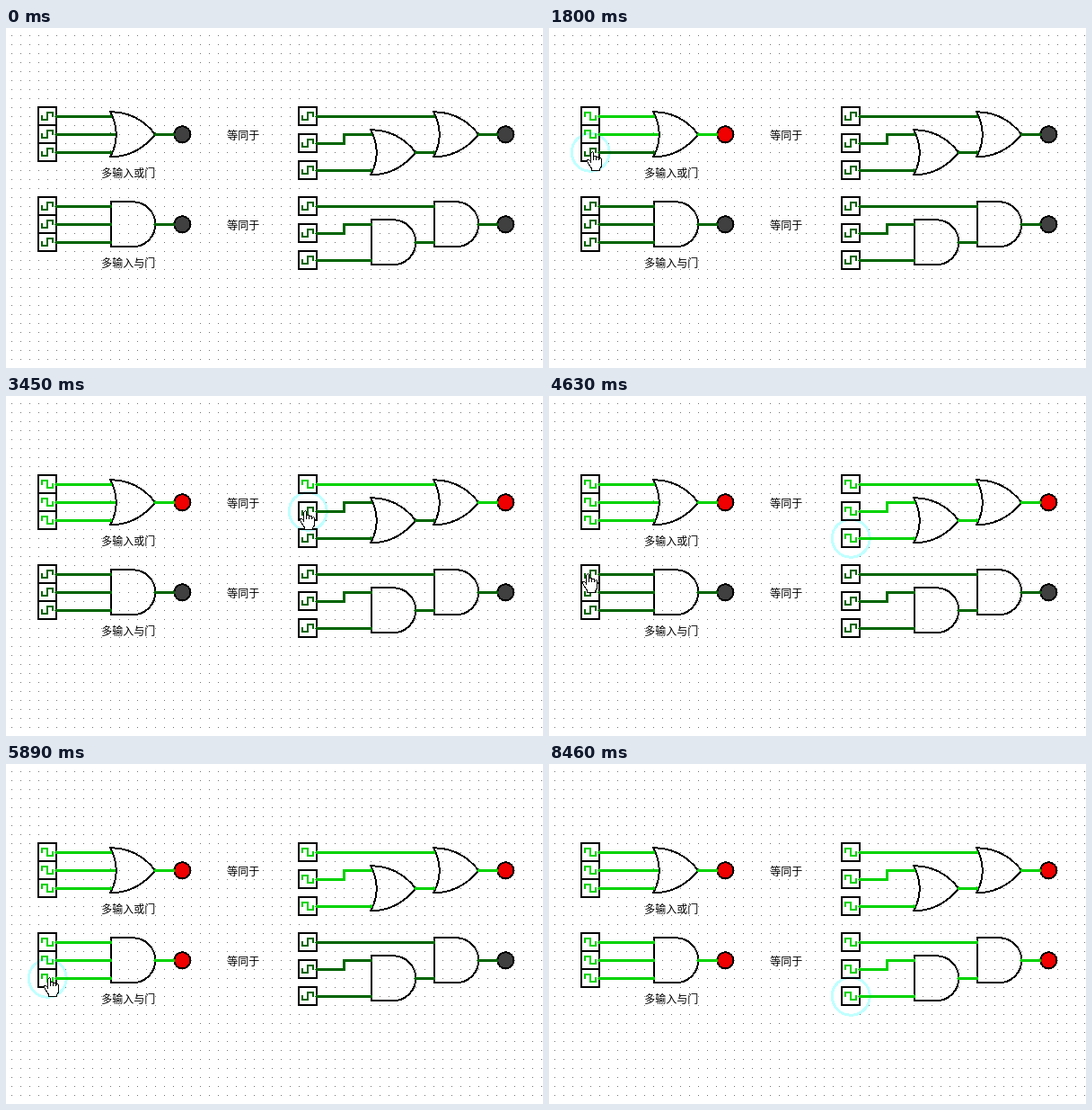
Write an HTML page that moves like this. It is 598 by 378 pixels and loops after 8.93 s.

```html
<!DOCTYPE html>
<html lang="zh-CN">
<head>
<meta charset="utf-8">
<style>
html, body { margin: 0; width: 598px; height: 378px; overflow: hidden; background: #fff; }
svg { display: block; }
path { fill: none; stroke: #000; stroke-width: 2; stroke-linecap: square; }
text { font: 12px "Noto Sans CJK SC", "Noto Sans CJK", sans-serif; }
</style>
</head>
<body>
<svg width="598" height="378" shape-rendering="crispEdges">
  <pattern id="grid" x="6" y="8" width="10" height="10" patternUnits="userSpaceOnUse">
    <rect width="1" height="1" fill="#777"/>
  </pattern>
  <rect width="598" height="378" fill="url(#grid)"/>
  <g id="scene" transform="translate(.25 .25)"></g>
</svg>
<script>
const scene = document.getElementById('scene');
const LOOP = 8930, STEP = 78.4;
const OR = 'M0 0Q-20-25-50-25Q-37 0-50 25Q-20 25 0 0Z';
const AND = 'M-25-25H-49V25H-25A25 25 0 0 0-25-25Z';
const FINGERS = [2, 6.5, 7.5, 9].map(top => `V${top}a1.5 1.5 0 0 1 3 0V10`).join('');
const HAND = `M4.5 12${FINGERS}V16l-2 3v2.5h-9v-2L.5 11.5v-2h2Z`;

// Steps at which the twelve inputs are pressed; each one switches a step later
const presses = [11, 19, 23, 39, 44, 48, 61, 66, 73, 85, 91, 98];

// Each row has three stacked inputs on the left and three spaced ones on the right
const inputs = presses.map((_, i) => {
  const right = i % 6 > 2, k = i % 3;
  return {
    x: right ? 336 : 46,
    y: 98 + 100 * Math.floor(i / 6) + k * (right ? 30 : 20),
    grip: right || !k ? -3 : 2
  };
});

// The pointer enters from below, visits every input and leaves
const stops = [{ x: 534, y: 380 }, ...inputs.map(p => ({ x: p.x + p.grip, y: p.y - 1 })), { x: 450, y: 446 }];
const times = [-2, ...presses, 114];

const signal = on => on ? '#00d200' : '#006400';

function circle(x, y, r, fill, stroke = 'none', width = 2) {
  return `<circle cx="${x}" cy="${y}" r="${r}" fill="${fill}" stroke="${stroke}" stroke-width="${width}"/>`;
}

function clock({ x, y }, on) {
  const d = on ? 4 : -4;
  return `<path d="M${x - 10} ${y - 10}h20v20h-20Z"/>` +
    `<path d="M${x - 6} ${y}v${-d}h6v${2 * d}h6v${-d}" style="stroke:${signal(on)}"/>`;
}

const gate = (x, y, shape) => `<path d="${shape}" transform="translate(${x} ${y})"/>`;
const led = (x, y, on) => circle(x, y, 9, on ? '#f00000' : '#404040', '#000');
const label = (text, x, y) => `<text x="${x}" y="${y}">${text}</text>`;

function drawRow(y, pins, isAnd) {
  const shape = isAnd ? AND : OR;
  const join = (...v) => isAnd ? v.every(Boolean) : v.some(Boolean);
  const [a, b, c, d, e, f] = pins;
  const left = join(a, b, c), inner = join(e, f), right = join(d, inner);
  let wires = '', ports = '';

  // Wires into a curved gate reach past the port by "inset"
  function wire(on, x1, y1, x2, y2 = y1, inset = 0) {
    const bend = y1 === y2 ? '' : `H${(x1 + x2) / 2}V${y2}`;
    wires += `<path d="M${x1} ${y1}${bend}H${x2 + (isAnd ? 0 : inset)}" style="stroke:${signal(on)};stroke-width:3"/>`;
    ports += circle(x1, y1, 2, signal(on)) + circle(x2, y2, 2, signal(on));
  }
  wire(a, 56, y - 20, 116, y - 20, 1);
  wire(b, 56, y, 116, y, 5);
  wire(c, 56, y + 20, 116, y + 20, 1);
  wire(left, 166, y, 186);
  wire(d, 346, y - 20, 476, y - 20, 1);
  wire(e, 346, y + 10, 406, y, 1);
  wire(f, 346, y + 40, 406, y + 40, 1);
  wire(inner, 456, y + 20, 476, y + 20, 1);
  wire(right, 526, y, 546);

  return wires + gate(166, y, shape) + gate(456, y + 20, shape) + gate(526, y, shape) +
    led(196, y, left) + led(556, y, right) +
    label(isAnd ? '多输入与门' : '多输入或门', 106, y + 48) + label('等同于', 246, y + 6) +
    pins.map((on, i) => clock(inputs[i + (isAnd ? 6 : 0)], on)).join('') + ports;
}

function drawPointer(step) {
  const i = times.findIndex(t => t > step);
  const from = stops[i - 1], to = stops[i];
  const arrive = times[i] - 2;
  const travel = 1 + Math.hypot(to.x - from.x, to.y - from.y) / 24;
  const leave = Math.max(times[i - 1] + 2, arrive - travel);
  const u = step >= arrive ? 1 : Math.max(0, (step - leave) / (arrive - leave));
  const x = from.x + (to.x - from.x) * (1 - (1 - u) ** 3);
  const y = from.y + (to.y - from.y) * u * u * (3 - 2 * u);
  return `<path d="${HAND}" transform="translate(${Math.round(x) - 6} ${Math.round(y)})" style="fill:#fff;stroke-width:1"/>`;
}

function draw(step) {
  const state = presses.map(p => step > p);
  const halo = inputs[presses.filter(p => step >= p).length - 1];
  scene.innerHTML = (halo ? circle(halo.x, halo.y, 21, 'none', '#c0ffff', 3) : '') +
    drawRow(118, state.slice(0, 6), false) +
    drawRow(218, state.slice(6), true) +
    drawPointer(step);
}

const start = performance.now();
let shown = -1;
function tick() {
  // The picture updates in even steps
  const step = Math.floor(((performance.now() - start) % LOOP + 8) / STEP);
  if (step !== shown) draw(shown = step);
  requestAnimationFrame(tick);
}
tick();
</script>
</body>
</html>
```
